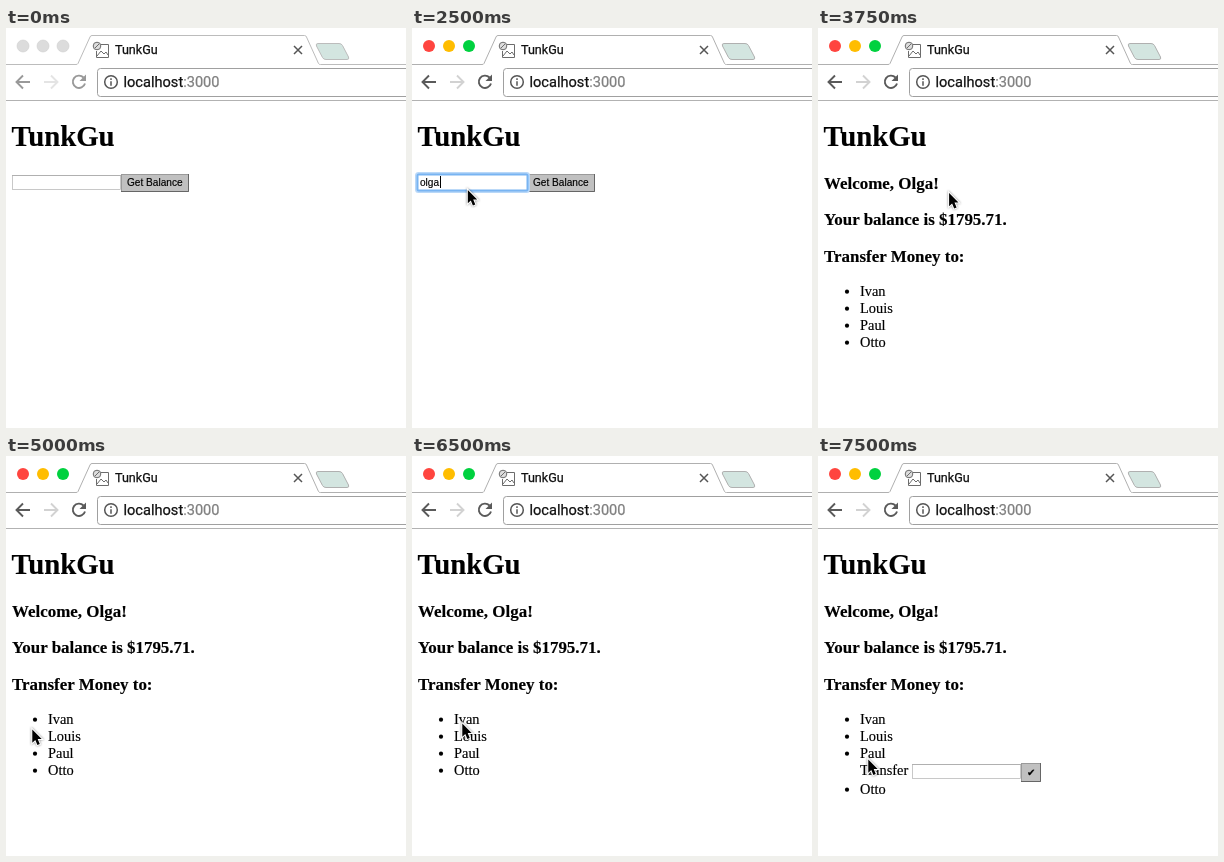
These frames come from a looping animation (400x400 px, 8000 ms). An HTML page:

```html
<!DOCTYPE html>
<html lang="en">
<head>
<meta charset="utf-8">
<title>TunkGu</title>
<style>
  html, body { margin: 0; width: 100%; height: 100%; overflow: hidden; background: #fff; }
  svg { display: block; width: 100%; height: 100%; }
  svg { --strip: #b0b0b0; --nav: #5a5a5a; --forward: #d2d2d2; }
  svg.idle { --strip: #bcbcbc; --nav: #999; --forward: #e4e4e4; }
  .idle .dots circle { fill: #dcdcdc; stroke: #cfcfcf; }
  .line { fill: none; stroke: #b2b2b2; }
  .strip { fill: none; stroke: var(--strip); }
  .nav, .glyph { fill: none; stroke: var(--nav); stroke-width: 1.9; }
  .glyph { stroke: #555; stroke-width: 1.5; }
  .ui { font-family: Roboto, sans-serif; fill: #111; stroke: #111; stroke-width: .25; }
  .ui .port { fill: #808080; stroke: #808080; }
  .page { font: 14.4px "Liberation Serif", serif; }
  .page text { stroke: #000; stroke-width: .15; }
  .h1 { font-size: 28.8px; font-weight: bold; }
  .h3 { font-size: 16.95px; font-weight: bold; }
  .field { font: 10.1px "Liberation Sans", sans-serif; }
</style>
</head>
<body>
<svg viewBox="0 0 400 400">
  <defs>
    <g id="input">
      <path d="M.5 15V.5H108.5V14.5H.5" fill="#fff" stroke="#c8c8c8"/>
      <path d="M0 .5H109" stroke="#b0b0b0"/>
    </g>
  </defs>

  <g class="dots" stroke-width=".6">
    <circle cx="17" cy="18" r="6" fill="#ff453f"/>
    <circle cx="37" cy="18" r="6" fill="#ffbd00"/>
    <circle cx="57" cy="18" r="6" fill="#00d13f"/>
  </g>
  <path class="strip" d="M0 36.5H70Q71.500 36.500 72 35.500L84 9Q84.500 7.500 86 7.500H298.500Q300 7.500 300.500 9L312.500 35.500Q313 36.500 314.500 36.500H400"/>
  <path class="line" d="M0 72.500H400"/>
  <path class="strip" d="M312 15.500H333Q335.500 15.500 336.500 17.500L342.500 29Q343.500 31.500 341 31.500H320Q317.500 31.500 316.500 29.500L310.500 18Q309.500 15.500 312 15.500Z" style="fill:#d3e5e0"/>

  <g fill="none" stroke="#6c6c6c">
    <path d="M95 16.500H102.500V29.500H90.500V23" fill="#fff"/>
    <path d="M91 28L95 23L98 26L100 24L102 27"/>
    <circle cx="91" cy="18" r="3.800" fill="#ddd"/>
    <path d="M89 20L93 16"/>
  </g>
  <text class="ui" x="109" y="26" font-size="12.600">TunkGu</text>
  <path class="glyph" d="M288 18L296 26M296 18L288 26"/>

  <path class="nav" d="M24 54H11M17 47.500L10.500 54L17 60.500"/>
  <path class="nav" d="M38 54H51M45 47.500L51.500 54L45 60.500" style="stroke:var(--forward)"/>
  <path class="nav" d="M77.500 49.500A6.200 6.200 0 1 0 79 55.500"/>
  <path d="M80 46.500V53H73.500Z" fill="var(--nav)"/>
  <rect class="line" x="91.500" y="40.500" width="320" height="28" rx="3" style="stroke:#a0a0a0"/>
  <circle class="glyph" cx="105" cy="54" r="6.300"/>
  <path class="glyph" d="M105 50.200V51.900M105 53.200V57.800"/>
  <text class="ui" x="117.500" y="59" font-size="14.600">localhost<tspan class="port">:3000</tspan></text>

  <g class="page">
    <text class="h1" x="5.600" y="118">TunkGu</text>

    <g id="login" class="field">
      <use href="#input" x="6" y="147"/>
      <rect x="115.500" y="146.500" width="67" height="17" fill="#c0c0c0" stroke="#9a9a9a"/>
      <path d="M115 163.500H182.500V146" fill="none" stroke="#666"/>
      <text x="121" y="158">Get Balance</text>
      <g id="focus" fill="none">
        <rect x="4.500" y="145.500" width="112" height="18" rx="2" stroke="#b9d8f8" stroke-width="3"/>
        <rect x="5.500" y="146.500" width="110" height="16" rx="1" fill="#fff" stroke="#78b4f2" stroke-width="2"/>
      </g>
      <text id="typed" x="8" y="158"></text>
      <path id="caret" d="M.5 148V160" stroke="#000"/>
    </g>

    <g id="account">
      <g class="h3">
        <text x="6" y="161">Welcome, Olga!</text>
        <text x="6" y="197">Your balance is $1795.71.</text>
        <text x="6" y="234">Transfer Money to:</text>
      </g>
      <g id="people"></g>
      <g id="transfer">
        <text x="42" y="0">Transfer</text>
        <use href="#input" x="94" y="-11"/>
        <rect x="203.500" y="-11.500" width="19" height="18" fill="#c0c0c0" stroke="#9a9a9a"/>
        <path d="M203 6.500H222.500V-12" fill="none" stroke="#666"/>
        <text x="209" y="1" style="font:10px 'DejaVu Sans',sans-serif">✔</text>
      </g>
    </g>
  </g>

  <path id="cursor" d="M.3 .5V13.800L3.300 11L5.400 16L7.800 15L5.700 10.100H9.700Z" stroke="#fff" stroke-width="2" paint-order="stroke" style="filter:drop-shadow(0 .8px .8px #0007)"/>
</svg>

<script>
const $ = id => document.getElementById(id);
const stage = document.querySelector('svg');
const show = (id, on) => $(id).style.display = on ? '' : 'none';
const move = (el, x, y) => el.setAttribute('transform', `translate(${x} ${y})`);
const within = (t, from, to) => t >= from && t < to;

const names = ['Ivan', 'Louis', 'Paul', 'Otto'];
$('people').innerHTML = names.map(name =>
  `<g><circle cx="29" cy="-4.300" r="2.100"/><text x="42">${name}</text></g>`).join('');
const rows = [...$('people').children];

// Pointer stops: time, x, y
const stops = [
  [250, 85.5, 174.5], [500, 56.5, 174.5], [750, 55.5, 161.5],
  [3000, 103.5, 164.5], [3250, 130.8, 164.5],
  [5000, 26, 273], [5250, 35, 270], [5500, 50, 267],
  [6750, 48.8, 282], [7000, 48.8, 299.5], [7250, 50, 303]
];

function draw(t) {
  stage.classList.toggle('idle', t < 1000);
  show('login', t < 3750);
  show('account', t >= 3750);

  show('focus', t >= 1750);
  $('typed').textContent = t < 2250 ? '' : t < 2500 ? 'o' : 'olga';
  show('caret', t >= 1750 && !within(t, 3000, 3500));
  move($('caret'), t < 2250 ? 8 : t < 2500 ? 14 : 28, 0);

  const open = within(t, 6000, 6500) ? 0 : t >= 7500 ? 2 : -1;
  rows.forEach((row, i) => move(row, 0, 268 + 17 * i + (open >= 0 && i > open ? 19 : 0)));
  show('transfer', open >= 0);
  move($('transfer'), 0, 285 + 17 * open);

  const stop = stops.findLast(s => t >= s[0]);
  show('cursor', stop);
  if (stop) move($('cursor'), stop[1], stop[2]);
}

function tick() {
  draw(performance.now() % 8000);
  requestAnimationFrame(tick);
}
tick();
</script>
</body>
</html>
```
